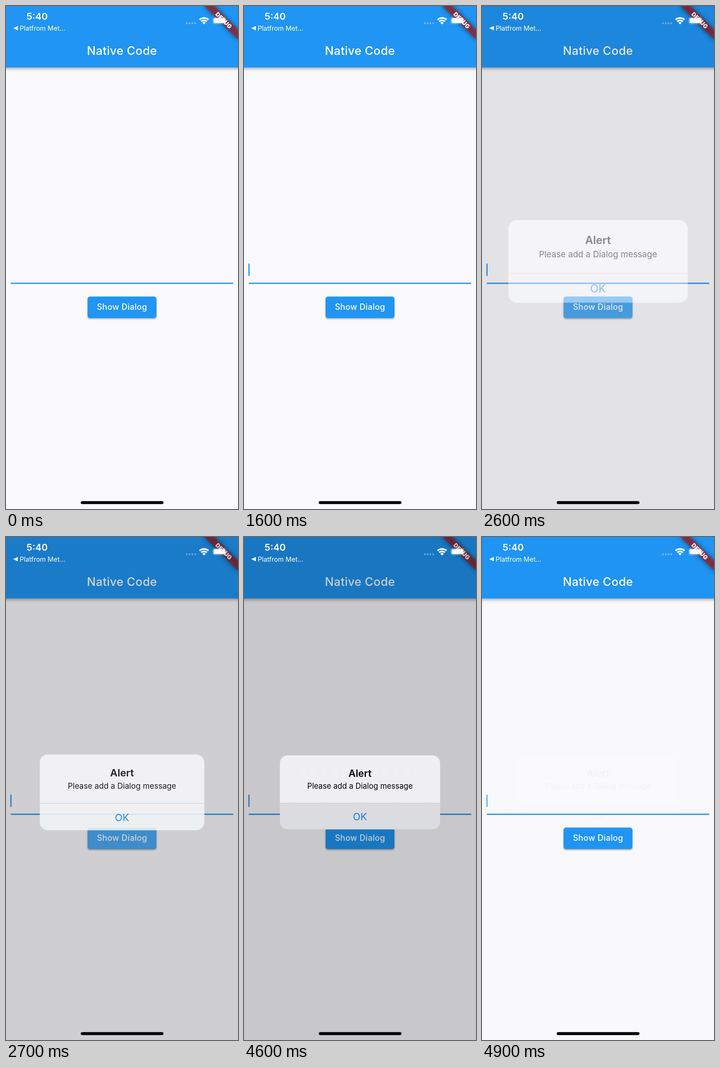
These frames come from a looping animation (509x1101 px, 5 s). An HTML page:

```html
<!DOCTYPE html>
<html lang="en">
<head>
<meta charset="utf-8">
<title>Native Code</title>
<style>
  html, body { margin: 0; width: 100%; height: 100%; overflow: hidden; background: #faf9fc; }
  svg { display: block; width: 100%; height: 100%; }
  text { font-family: Inter, "Noto Sans", sans-serif; fill: #fff; }
  .mid { text-anchor: middle; }
  .blue { fill: #2095f3; }

  .bar { filter: drop-shadow(0 3px 3px rgba(0,0,0,.26)) drop-shadow(0 1px 4px rgba(0,0,0,.1)); }
  .btn { filter: drop-shadow(0 2px 1.6px rgba(0,0,0,.26)) drop-shadow(0 1px 2px rgba(0,0,0,.12)); }
  .title { font-size: 25.6px; font-weight: 500; letter-spacing: .33px; }
  .label { font-size: 18px; font-weight: 500; letter-spacing: .28px; }
  .shade { filter: blur(5.2px); }
  .debug { font-size: 12.9px; font-weight: 900; }
  .clock { font-size: 20.6px; font-weight: 600; }
  .back { font-size: 14.5px; }

  .head { font-size: 21.5px; font-weight: 600; fill: #000; }
  .body { font-size: 16.7px; fill: #000; }
  .ok { font-size: 21.5px; fill: #0c7de9; }

  /* The picture advances in held steps of 100 ms */
  .cursor { animation: blink 1s step-end infinite; }
  .ripple, .modal, .dialog, .press { animation: 5s step-end infinite; }
  .ripple { animation-name: ripple; opacity: 0; transform-origin: 247.5px 659px; }
  .modal { animation-name: fade; opacity: 0; }
  .dialog { animation-name: settle; transform-origin: 254.5px 559px; }
  .press { animation-name: press; opacity: 0; }

  @keyframes blink {
    0% { opacity: 0; }
    30% { opacity: 1; }
    90% { opacity: .75; }
    100% { opacity: 0; }
  }
  @keyframes ripple {
    0% { opacity: 0; transform: scale(1); }
    50% { opacity: .21; transform: scale(1); }
    52% { opacity: .21; transform: scale(2.1); }
    54% { opacity: .2; transform: scale(2.4); }
    56% { opacity: .12; transform: scale(2.4); }
    58% { opacity: .04; transform: scale(2.4); }
    60%, 100% { opacity: 0; transform: scale(2.4); }
  }
  @keyframes fade {
    0% { opacity: 0; }
    52% { opacity: .46; }
    54% { opacity: .88; }
    56% { opacity: .98; }
    58% { opacity: 1; }
    94% { opacity: .6; }
    96% { opacity: .16; }
    98% { opacity: .03; }
    100% { opacity: 0; }
  }
  @keyframes settle {
    0% { transform: scale(1.12); }
    54% { transform: scale(1.027); }
    56% { transform: scale(1.005); }
    58%, 100% { transform: scale(1); }
  }
  @keyframes press {
    0% { opacity: 0; }
    90%, 100% { opacity: .075; }
  }
</style>
</head>
<body>
<svg viewBox="0 0 509 1101">
  <defs>
    <clipPath id="btnClip"><rect x="179" y="636" width="151" height="47" rx="5.2"/></clipPath>
    <clipPath id="boxClip"><rect x="78.5" y="478" width="352" height="162" rx="18"/></clipPath>
    <linearGradient id="glass" x2="0" y2="1">
      <stop offset="0" stop-color="#f0eff2"/>
      <stop offset=".64" stop-color="#efeef1"/>
      <stop offset="1" stop-color="#ebeef2"/>
    </linearGradient>
  </defs>

  <!-- App page -->
  <rect width="509" height="1101" fill="#faf9fc"/>
  <rect class="bar blue" x="-20" y="-20" width="549" height="154.5"/>
  <text class="title mid" x="254.5" y="107">Native Code</text>

  <rect class="cursor blue" x="9.6" y="563.5" width="2.6" height="27.5" rx="1.3"/>
  <rect class="blue" x="10.4" y="605.6" width="488.2" height="2.7"/>

  <rect class="btn blue" x="179" y="636" width="151" height="47" rx="5.2"/>
  <g clip-path="url(#btnClip)">
    <circle class="ripple" cx="247.5" cy="659" r="47.5" fill="#fff"/>
  </g>
  <text class="label mid" x="254.5" y="665.3">Show Dialog</text>

  <g transform="translate(509 0) rotate(45)">
    <rect class="shade" x="-52.2" y="36.5" width="104.4" height="15.7" fill="#000" opacity=".5"/>
    <rect x="-56" y="36.5" width="112" height="15.7" fill="#b71c1c" opacity=".627"/>
    <text class="debug mid" y="49">DEBUG</text>
  </g>

  <!-- Alert -->
  <g class="modal">
    <rect width="509" height="1101" opacity=".2"/>
    <g class="dialog">
      <g clip-path="url(#boxClip)">
        <rect x="78.5" y="478" width="352" height="162" fill="url(#glass)"/>
        <rect class="press" x="78.5" y="583" width="352" height="57"/>
        <rect x="78.5" y="582" width="352" height="1" fill="#c5c5c8"/>
      </g>
      <text class="head mid" x="254.5" y="525">Alert</text>
      <text class="body mid" x="254.5" y="551">Please add a Dialog message</text>
      <text class="ok mid" x="254.5" y="620">OK</text>
    </g>
  </g>

  <!-- System overlay -->
  <text class="clock mid" x="68.3" y="30.3">5:40</text>
  <path d="M15.8 48.5L26 43.7V53.3Z" fill="#fff"/>
  <text class="back" x="30" y="53.6">Platfrom Met...</text>

  <g fill="#fff" opacity=".3">
    <circle cx="396.8" cy="37.7" r="2.2"/>
    <circle cx="402.9" cy="37.7" r="2.2"/>
    <circle cx="409" cy="37.7" r="2.2"/>
    <circle cx="415.1" cy="37.7" r="2.2"/>
  </g>

  <g fill="none" stroke="#fff" stroke-width="3.5">
    <path d="M424.7 30A15 15 0 0 1 444.3 30"/>
    <path d="M428.2 33.8A9.4 9.4 0 0 1 440.8 33.8"/>
    <path d="M434.5 40.4L430.7 36.4A5.6 5.6 0 0 1 438.3 36.4Z" fill="#fff" stroke="none"/>
  </g>

  <rect x="453.6" y="24.9" width="29.4" height="14.3" rx="4" fill="none" stroke="#fff" stroke-width="1.2" opacity=".4"/>
  <path d="M484.4 29.6Q486.6 30.2 486.6 32Q486.6 33.8 484.4 34.5Z" fill="#fff" opacity=".4"/>
  <rect x="455.3" y="26.6" width="26" height="10.9" rx="2.4" fill="#fff"/>

  <rect x="164" y="1083.7" width="181.5" height="6.6" rx="3.3"/>
</svg>
</body>
</html>
```
